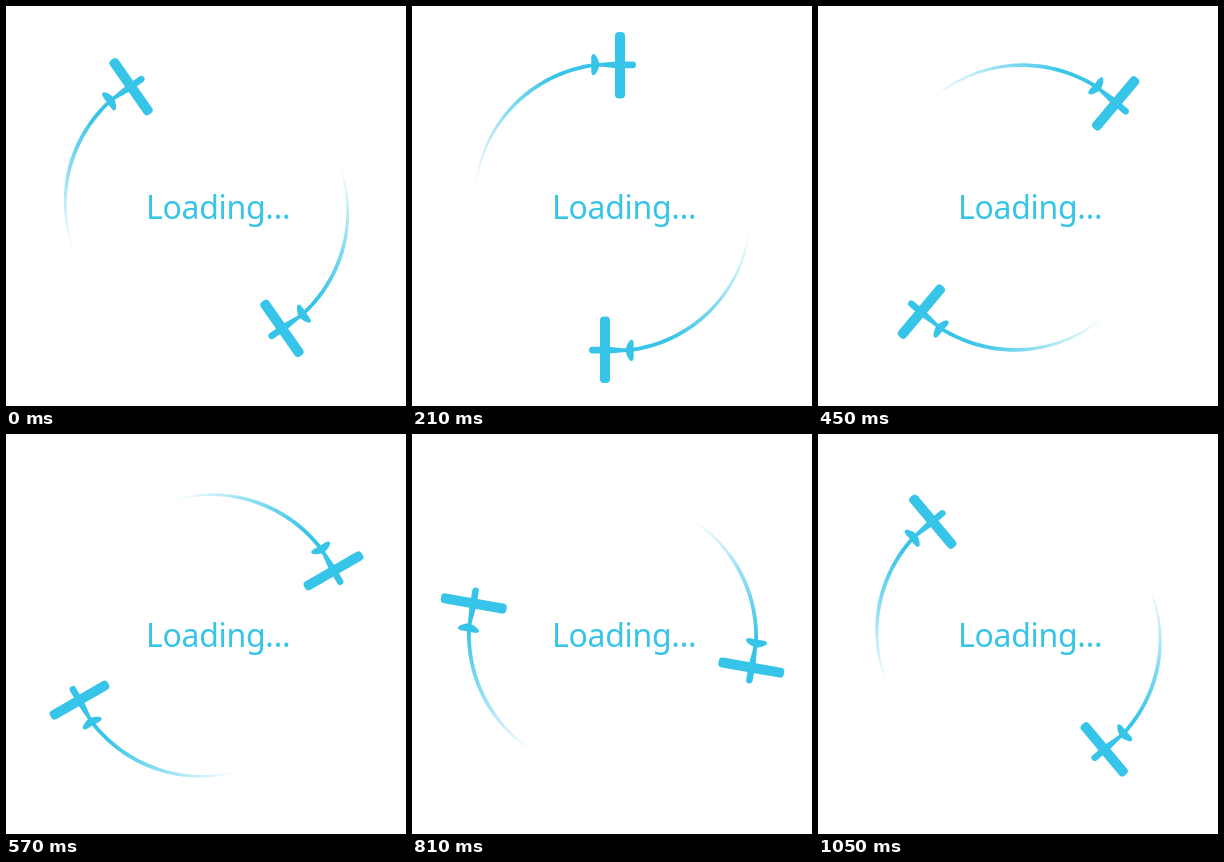
Animation, 400 px wide and 400 px high, one loop 1.08 s. Source, as an HTML page:

```html
<!DOCTYPE html>
<html lang="en">
<head>
<meta charset="utf-8">
<title>Loading</title>
<style>
  html, body { margin: 0; width: 100%; height: 100%; overflow: hidden; background: #fff; }
  svg { display: block; width: 100%; height: 100%; }
  text { font: 32px "Noto Sans", "Open Sans", sans-serif; letter-spacing: -0.3px; }
</style>
</head>
<body>
<svg viewBox="0 0 400 400" fill="#36c4e8">
  <defs>
    <linearGradient id="fade" gradientUnits="userSpaceOnUse">
      <stop offset="0" stop-color="#36c4e8"/>
      <stop offset="1" stop-color="#36c4e8" stop-opacity="0"/>
    </linearGradient>
    <g id="flyer">
      <path id="trail" fill="url(#fade)"/>
      <rect x="203" y="26" width="10" height="66.5" rx="4"/>
      <path d="M182 57.1 L190 56.8 L204 55.6 H221 Q224 56 224 59 Q224 62 221 62.2 H204 L190 60.8 L182 60.5 Z"/>
      <path d="M181.5 48 C184 48 187.3 55 187.3 58.5 C187.3 62 184 69.3 181.5 69.3 C179 69.3 179 65 179.6 58.5 C179 52 179 48 181.5 48 Z"/>
    </g>
  </defs>
  <g id="pair">
    <use href="#flyer"/>
    <use href="#flyer" transform="rotate(180 200.5 201.5)"/>
  </g>
  <text x="140" y="212.5">Loading...</text>
</svg>
<script>
  const CX = 200.5, CY = 201.5;
  const STEP_MS = 30, STEPS = 36, STEP_DEG = 5, START_DEG = -35;
  const PLANE_DEG = 3, TAIL_LAG = 10, FADE_SPAN = 58;
  const MEAN_LENGTH = 77, LENGTH_SWING = 8, LONGEST_MS = 290;

  const pair = document.getElementById("pair");
  const trail = document.getElementById("trail");
  const fade = document.getElementById("fade");

  // Point on the trail, given degrees behind the plane and offset from its centre line.
  function trailPoint(lag, offset = 0) {
    const angle = (PLANE_DEG - lag) * Math.PI / 180;
    const radius = 143.7 - 5.5 * (lag / 85) ** 2 + offset;
    return [CX + radius * Math.sin(angle), CY - radius * Math.cos(angle)];
  }

  function drawTrail(length) {
    const outer = [], inner = [];
    for (let i = 0; i <= 60; i++) {
      const lag = TAIL_LAG + (length - TAIL_LAG) * i / 60;
      const halfWidth = 1.9 - 1.1 * Math.max(0, (lag - 40) / (length - 40));
      outer.push(trailPoint(lag, halfWidth));
      inner.unshift(trailPoint(lag, -halfWidth));
    }
    trail.setAttribute("d", `M${outer.concat(inner).join("L")}Z`);

    const [x1, y1] = trailPoint(length - FADE_SPAN);
    const [x2, y2] = trailPoint(length);
    Object.entries({ x1, y1, x2, y2 }).forEach(([name, value]) => fade.setAttribute(name, value));
  }

  function draw(ms) {
    const step = Math.floor(ms / STEP_MS) % STEPS;
    const phase = 2 * Math.PI * (step - LONGEST_MS / STEP_MS) / STEPS;
    pair.setAttribute("transform", `rotate(${START_DEG + step * STEP_DEG} ${CX} ${CY})`);
    drawTrail(MEAN_LENGTH + LENGTH_SWING * Math.cos(phase));
  }

  const start = performance.now();
  function tick() {
    draw(performance.now() - start);
    requestAnimationFrame(tick);
  }
  tick();
</script>
</body>
</html>
```
